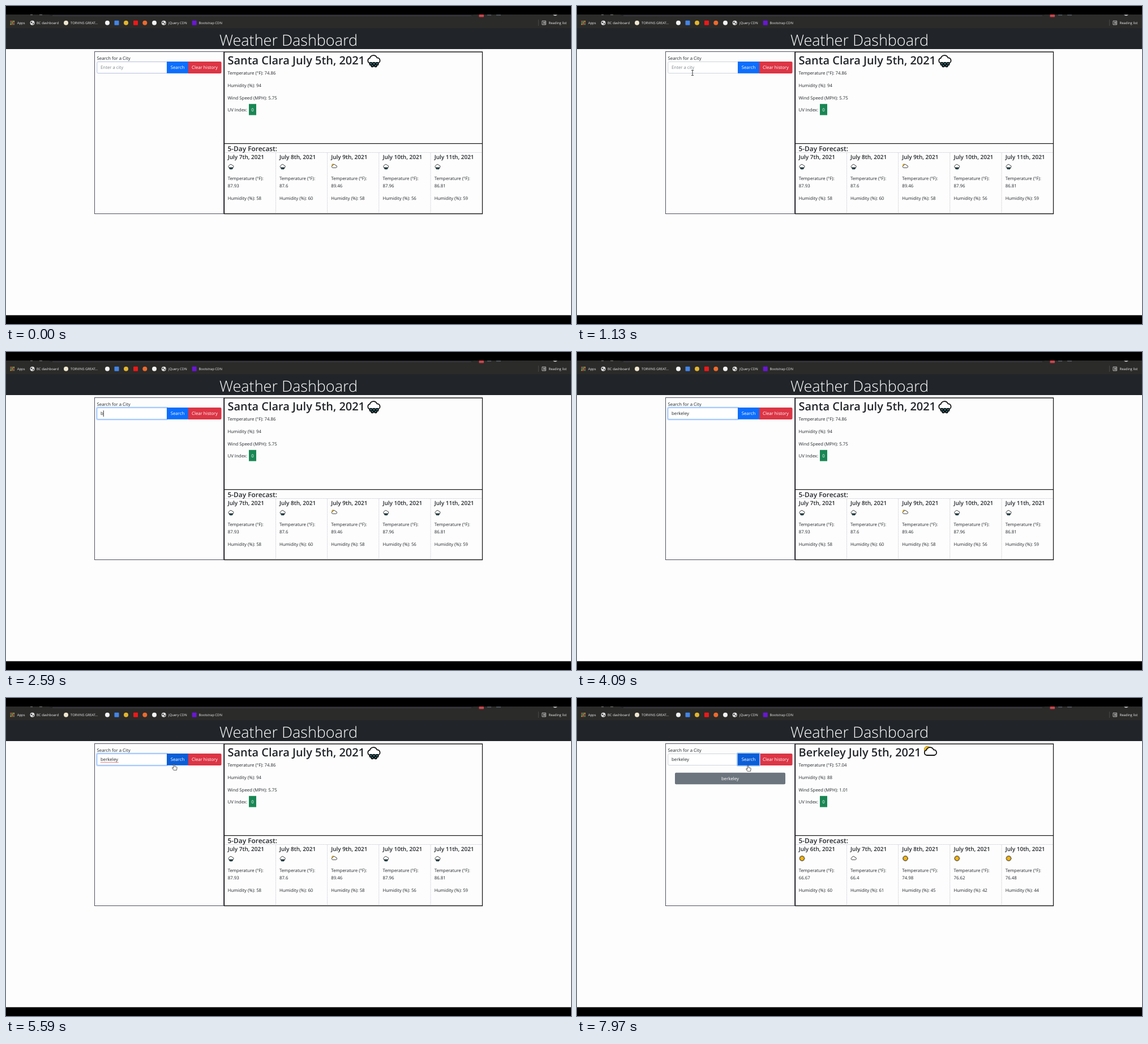
An HTML page that plays this animation: 998 by 561 pixels, repeating every 8 s.

```html
<!DOCTYPE html>
<html lang="en">
<head>
<meta charset="utf-8">
<title>Weather Dashboard</title>
<style>
  html, body { margin: 0; width: 100%; height: 100%; overflow: hidden; background: #000; }
  svg { display: block; width: 100%; height: 100%; }
  text { font: 400 7.82px "Open Sans", "Noto Sans", sans-serif; fill: #212529; white-space: pre; text-rendering: geometricPrecision; }
  .light { fill: #fff; }
  .mid { text-anchor: middle; }
  .tab { font-size: 5.95px; fill: #eee; }
  .title { font-size: 27px; font-weight: 300; fill: #fff; text-anchor: middle; }
  .city { font-size: 19.95px; font-weight: 600; }
  .section { font-size: 11.9px; font-weight: 600; }
  .date { font-size: 10px; font-weight: 600; }
  .hint { fill: #7f868d; }

  .anim { animation: 8s linear infinite; }
  .step { animation: 8s step-end infinite; }
  .before-data { animation-name: hide-at-data; }
  .after-data { animation-name: show-at-data; }
  .after-click { animation-name: show-at-click; }
  .squiggle { animation-name: squiggle; }
  #field { animation-name: field; }
  #field-ring { animation-name: field-ring; }
  #search { animation-name: hover; }
  #search-ring { animation-name: search-ring; }
  #pointer { animation-name: travel; }
  #arrow { animation-name: arrow; }
  #beam { animation-name: beam; }
  #hand { animation-name: hand; }

  @keyframes hide-at-data { 0% { visibility: visible } 87.5%, 100% { visibility: hidden } }
  @keyframes show-at-data { 0% { visibility: hidden } 87.5%, 100% { visibility: visible } }
  @keyframes show-at-click { 0% { visibility: hidden } 80%, 100% { visibility: visible } }
  @keyframes squiggle { 0% { visibility: hidden } 53.1% { visibility: visible } 80%, 100% { visibility: hidden } }
  @keyframes field {
    0% { stroke: #b4bfdd } 2%, 18.75% { stroke: #ced4da }
    20.6%, 80% { stroke: #86b7fe } 81.9%, 100% { stroke: #ced4da }
  }
  @keyframes field-ring { 0%, 18.75% { opacity: 0 } 20.6%, 80% { opacity: 1 } 81.9%, 100% { opacity: 0 } }
  @keyframes hover { 0%, 65.8% { fill: #0d6efd } 67.7%, 100% { fill: #0b5ed7 } }
  @keyframes search-ring { 0%, 80% { opacity: 0 } 81.9%, 100% { opacity: 1 } }
  @keyframes travel {
    0%, .5% { transform: translate(230px, 418px) }
    7.5% { transform: translate(212px, 200px) }
    11.25%, 58.75% { transform: translate(204px, 118px) }
    66.9%, 70% { transform: translate(296.8px, 116.8px) }
    77.5%, 85% { transform: translate(300.3px, 113px) }
    94%, 100% { transform: translate(302px, 118.7px) }
  }
  @keyframes arrow { 0% { visibility: hidden } .5% { visibility: visible } 11.2%, 100% { visibility: hidden } }
  @keyframes beam {
    0% { visibility: hidden } 11.2% { visibility: visible } 31.8% { visibility: hidden }
    58.75% { visibility: visible } 65.8%, 100% { visibility: hidden }
  }
  @keyframes hand { 0% { visibility: hidden } 65.8%, 100% { visibility: visible } }
</style>
</head>
<body>
<svg viewBox="0 0 998 561" preserveAspectRatio="none">
  <defs>
    <path id="cloud" d="M-6.5 5.5a4.7 4.7 0 0 1-.8-9.2A6.8 6.8 0 0 1 5.4-4.2A4.9 4.9 0 0 1 6.6 5.5Z" fill="#fff" stroke="#111" stroke-width="1.8"/>
    <g id="rain">
      <use href="#cloud"/>
      <g fill="#2b9fb5" stroke="#111" stroke-width="2">
        <circle cx="-5.4" cy="6.4" r="2.2"/><circle cx="0" cy="6.4" r="2.2"/><circle cx="5.4" cy="6.4" r="2.2"/>
        <circle cx="-2.9" cy="9.8" r="2"/><circle cx="2.9" cy="9.8" r="2"/>
      </g>
    </g>
    <g id="sun">
      <circle r="10.6" fill="none" stroke="#222" stroke-width="2.2" stroke-dasharray="2.6 1.56"/>
      <circle r="9" fill="#f5b50e" stroke="#332a12" stroke-width="1.6"/>
    </g>
    <g id="partly">
      <circle cx="-5.5" cy="-5" r="5.6" fill="#f7bd14" stroke="#5b4510" stroke-width="1" stroke-dasharray="1.6 1.3"/>
      <use href="#cloud"/>
    </g>
    <g id="globe">
      <circle r="4" fill="#e4e4e4"/>
      <path d="M-3-1.5L-.5-2.5L0-.3L-2 1ZM.5 1L2.8-.5L2.5 2L.8 3Z" fill="#444"/>
    </g>
  </defs>

  <rect width="998" height="561"/>
  <rect y="15" width="998" height="24.5" fill="#2b2b2a"/>
  <path d="M76 15H826Q824 17 818 17H84Q78 17 76 15Z" fill="#202023"/>
  <path d="M82 17H822" stroke="#47474e"/>
  <rect x="835.5" y="15" width="8.5" height="4.5" rx="1" fill="#c8434a"/>
  <path d="M850 16h7M866 16h8" stroke="#6c7681"/>
  <path d="M966 15.5Q970 19 974 15.5Z" fill="#ddd"/>
  <path d="M43 15.5h4M59 15.5h5" stroke="#999" stroke-width=".8"/>
  <rect y="39" width="998" height="37" fill="#212529"/>
  <rect y="76" width="998" height="469.5" fill="#fdfdfd"/>
  <g id="bookmarks"></g>
  <text class="title" x="499" y="70">Weather Dashboard</text>

  <rect x="156.5" y="80.5" width="228" height="286" fill="none" stroke="#50505f"/>
  <path d="M385.5 81H841.5V366.5H385.5ZM385.5 242.7H841.5" fill="none" stroke="#1c1c1c" stroke-width="1.3"/>
  <path d="M386 258.5H841M476.5 259V365.5M567.6 259V365.5M658.7 259V365.5M750 259V365.5" stroke="#c3c3d0" stroke-width=".8" stroke-dasharray="1.6 1"/>

  <text x="160.5" y="95">Search for a City</text>
  <rect id="field-ring" class="anim" x="159" y="96.5" width="127.2" height="24" rx="3" fill="#c2dbfe"/>
  <rect id="field" class="anim" x="160.8" y="98.4" width="124" height="20.2" rx="2" fill="#fff"/>
  <text id="typed" x="167" y="111.4"></text>
  <path id="caret" d="M0 103.2V114" stroke="#111" stroke-width=".9"/>
  <path class="step squiggle" d="M167 113.5H198.5" stroke="#e0484f" stroke-width=".9" stroke-dasharray="1.5 .5"/>
  <path d="M322 98H378.5a2 2 0 0 1 2 2V117a2 2 0 0 1-2 2H322Z" fill="#dc3545"/>
  <rect id="search-ring" class="anim" x="282" y="96.2" width="41.8" height="24.4" rx="2" fill="#98c1fe"/>
  <rect id="search" class="anim" x="284" y="98" width="38" height="20.8"/>
  <text class="light mid" x="303" y="111.4">Search</text>
  <text class="light mid" x="351" y="111.4">Clear history</text>
  <g class="step after-click">
    <rect x="173" y="131.8" width="195" height="20.5" rx="2" fill="#6c757d"/>
    <text class="light mid" x="270.5" y="145">berkeley</text>
  </g>

  <text class="section" x="391.5" y="256">5-Day Forecast:</text>
  <rect x="429" y="172.8" width="13" height="19.7" fill="#198754"/>
  <text x="391.5" y="186">UV Index:</text>
  <text class="light mid" x="435.5" y="186">0</text>
  <g id="reports"></g>

  <g id="pointer" class="anim">
    <path id="arrow" class="step" d="M0 0V9.5L2.2 7.5L3.8 11L5.3 10.3L3.8 7H6.8Z" fill="#fff" stroke="#222" stroke-width=".7"/>
    <path id="beam" class="step" d="M-2-4.5H-.5L0-4L.5-4.5H2M0-4V4M-2 4.5H-.5L0 4L.5 4.5H2" fill="none" stroke="#222" stroke-width=".9"/>
    <path id="hand" class="step" d="M-1 .6Q0-.5 1 .6V4L4.5 4.8Q5.4 5.1 5.2 6.3L4.4 10.6H-.6L-3.2 6.8Q-3.3 5.5-2 5.8L-1 6.8Z" fill="#fff" stroke="#222" stroke-width=".8" stroke-linejoin="round"/>
  </g>
</svg>
<script>
const byId = id => document.getElementById(id);
const label = (x, y, str, cls = '') => `<text x="${x}" y="${y}" class="${cls}">${str}</text>`;
const icon = (name, x, y, scale = 1) => `<use href="#${name}" transform="translate(${x} ${y}) scale(${scale})"/>`;
const dot = (x, color) => `<circle cx="${x}" cy="29.7" r="4" fill="${color}"/>`;
const block = (x, color) => `<rect x="${x - 4}" y="25.7" width="8" height="8" rx="1" fill="${color}"/>`;

const appColors = ['#e25b4b', '#5fae62', '#e2b64b'];
const apps = Array.from({ length: 9 }, (_, i) => {
  const col = i % 3, row = Math.floor(i / 3);
  return `<rect x="${7.5 + col * 2.7}" y="${26 + row * 2.7}" width="1.9" height="1.9" fill="${appColors[(col + row) % 3]}"/>`;
}).join('');

byId('bookmarks').innerHTML = apps + icon('globe', 46.5, 29.7) + icon('globe', 278.7, 29.7) +
  dot(106, '#eee6cf') + dot(179, '#f1f3f4') + block(195.5, '#4285e8') + dot(212, '#e3b52c') +
  block(229, '#f01818') + dot(245.3, '#ee6a2c') + dot(262, '#f2f2f2') + block(332.7, '#6a16d6') +
  label(19.7, 32, 'Apps', 'tab') + label(54, 32, 'BC dashboard', 'tab') +
  label(114, 32, 'TORVINS GREAT...', 'tab') + label(287, 32, 'jQuery CDN', 'tab') +
  label(340.5, 32, 'Bootstrap CDN', 'tab') + label(958.5, 32, 'Reading list', 'tab') +
  '<path d="M940.5 24V35" stroke="#555" stroke-width=".7"/>' +
  '<path d="M947 26.3H953.5V33H947ZM949 28.3H952.5M949 29.7H952.5M949 31.1H952.5" fill="none" stroke="#ddd" stroke-width=".8"/>';

const reports = [
  {
    when: 'before-data', city: 'Santa Clara', sky: 'rain', skyX: 650, now: ['74.86', 94, '5.75'],
    days: [[7, 'rain', '87.93', 58], [8, 'rain', '87.6', 60], [9, 'partly', '89.46', 58], [10, 'rain', '87.96', 56], [11, 'rain', '86.81', 59]]
  },
  {
    when: 'after-data', city: 'Berkeley', sky: 'partly', skyX: 624.5, now: ['57.04', 88, '1.01'],
    days: [[6, 'sun', '66.67', 60], [7, 'cloud', '66.4', 61], [8, 'sun', '74.98', 45], [9, 'sun', '76.62', 42], [10, 'sun', '76.48', 44]]
  }
];

const dayColumn = ([day, sky, temp, humidity], i) => {
  const x = 391.7 + i * 91.25;
  return label(x, 269.6, `July ${day}th, 2021`, 'date') +
    icon(sky, x + 5.8, 283, .43) +
    label(x, 307.4, 'Temperature (°F):') + label(x, 320.4, temp) +
    label(x, 342, `Humidity (%): ${humidity}`);
};

byId('reports').innerHTML = reports.map(({ when, city, sky, skyX, now, days }) =>
  `<g class="step ${when}">` +
  label(391.5, 103, `${city} July 5th, 2021`, 'city') + icon(sky, skyX, 95.5) +
  label(391.5, 121.4, `Temperature (°F): ${now[0]}`) +
  label(391.5, 143, `Humidity (%): ${now[1]}`) +
  label(391.5, 164.5, `Wind Speed (MPH): ${now[2]}`) +
  days.map(dayColumn).join('') + '</g>').join('');

const LOOP = 8000, FOCUS = 1500, BLUR = 6400, FIRST_KEY = 2550, KEY_GAP = 137, BLINK = 530;
const query = 'berkeley', typed = byId('typed'), caret = byId('caret');
let start;

function render(now) {
  start ??= now;
  const t = (now - start) % LOOP;
  const count = Math.max(0, Math.min(query.length, Math.floor((t - FIRST_KEY) / KEY_GAP) + 1));
  typed.textContent = count ? query.slice(0, count) : 'Enter a city';
  typed.setAttribute('class', count ? '' : 'hint');
  const lastKey = count ? FIRST_KEY + (count - 1) * KEY_GAP : FOCUS;
  const lit = t >= FOCUS && t < BLUR && (t - lastKey) % (2 * BLINK) < BLINK;
  caret.style.visibility = lit ? 'visible' : 'hidden';
  const width = count ? typed.getComputedTextLength() : 0;
  caret.setAttribute('transform', `translate(${167.4 + width} 0)`);
  requestAnimationFrame(render);
}
requestAnimationFrame(render);
</script>
</body>
</html>
```
